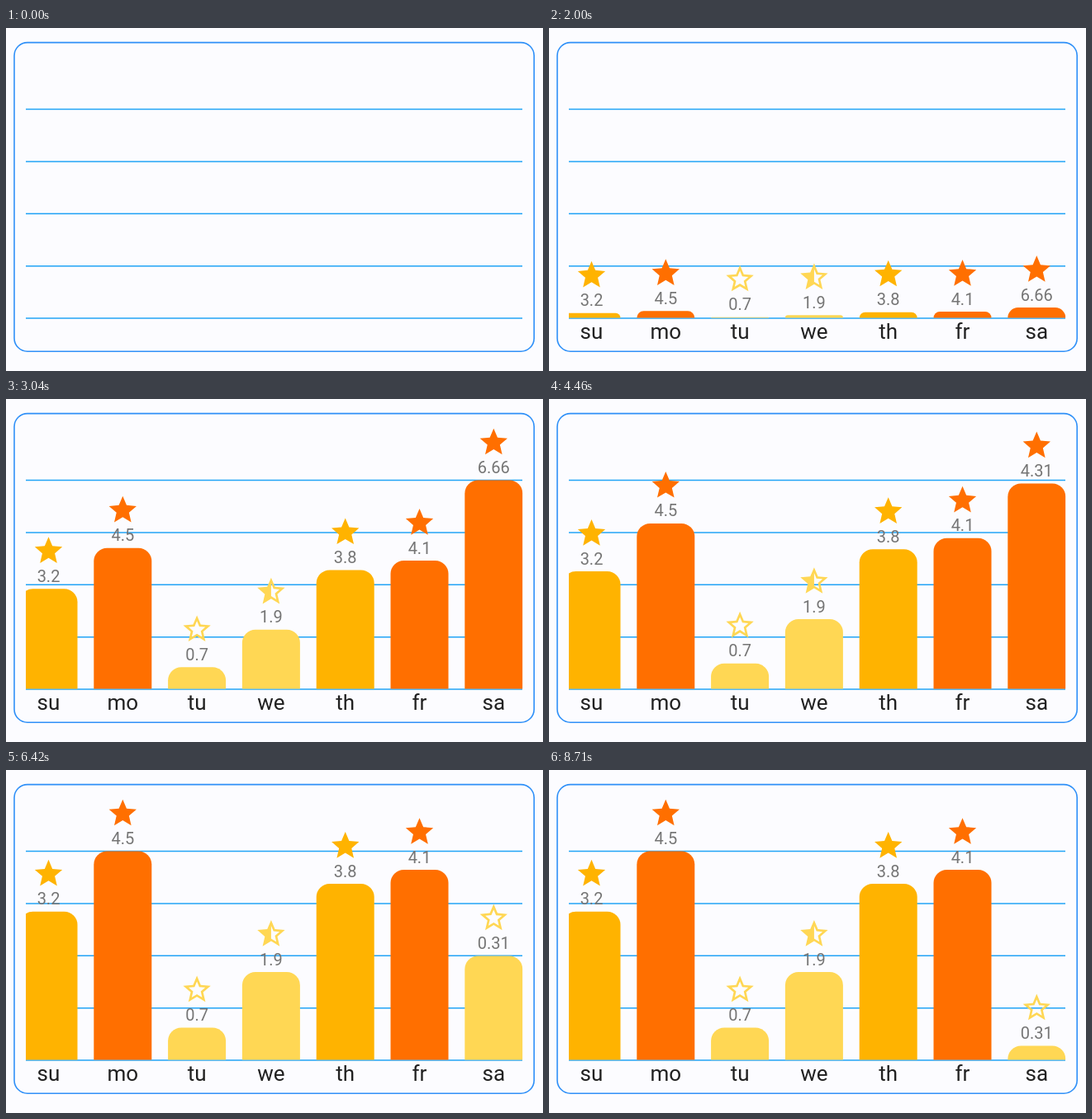
Animation, 650 px wide and 416 px high, one loop 8830 ms. Source, as an HTML page:

```html
<!DOCTYPE html>
<html lang="en">
<head>
<meta charset="utf-8">
<title>Weekly ratings</title>
<style>
  html, body { margin: 0; width: 100%; height: 100%; overflow: hidden; background: #fcfcff; }
  svg { display: block; width: 650px; height: 416px; font-family: Roboto, sans-serif; text-anchor: middle; }
  .card { fill: none; stroke: #2f90f8; stroke-width: 1.6; }
  .grid { stroke: #22a4f6; stroke-width: 1.5; }
  .value { font-size: 20px; fill: #757575; }
  .day { font-size: 26px; fill: #212121; }
</style>
</head>
<body>
<svg viewBox="0 0 650 416">
  <defs><clipPath id="plot"><rect x="24" y="0" width="601.5" height="416"/></clipPath></defs>
  <rect class="card" x="10" y="17.6" width="629.2" height="374.6" rx="16"/>
  <g class="grid" id="grid"></g>
  <g id="chart" clip-path="url(#plot)" visibility="hidden"></g>
</svg>
<script>
const LOOP = 8830, RUN = 1000;
const BASE = 352, HEIGHT = 253.4, BAR = 70, STEP = 89.8, FIRST = 51.5, RADIUS = 16;
const DAYS = ['su', 'mo', 'tu', 'we', 'th', 'fr', 'sa'];
const VALUES = [3.2, 4.5, 0.7, 1.9, 3.8, 4.1];
const SHOW = 1950;

// Last bar: each update starts at `at` and moves value and axis maximum.
const UPDATES = [
  { at: SHOW, from: 6.66, to: 6.66, maxFrom: 6.66, maxTo: 6.66 },
  { at: 4003, from: 6.66, to: 4.31, maxFrom: 6.66, maxTo: 4.5 },
  { at: 5905, from: 4.31, to: 0.31, maxFrom: 4.5, maxTo: 4.5 }
];

const OUTER = 'M12 17.27L18.18 21l-1.64-7.03L22 9.24l-7.19-.61L12 2 9.19 8.63 2 9.24l5.46 4.73L5.82 21z';
const STARS = {
  full: OUTER,
  half: OUTER + 'M12 15.4V6.1l1.71 4.04 4.38.38-3.32 2.88 1 4.28z',
  empty: OUTER + 'M12 15.4l-3.76 2.27 1-4.28-3.32-2.88 4.38-.38L12 6.1l1.71 4.04 4.38.38-3.32 2.88 1 4.28z'
};

const chart = document.getElementById('chart');
const grid = document.getElementById('grid');

function add(parent, tag, attrs = {}, text = '') {
  const node = document.createElementNS('http://www.w3.org/2000/svg', tag);
  for (const key in attrs) node.setAttribute(key, attrs[key]);
  node.textContent = text;
  parent.append(node);
  return node;
}

const color = v => v >= 4 ? '#ff6f00' : v >= 3 ? '#ffb300' : '#ffd754';
const star = v => v >= 3 ? STARS.full : v >= 1 ? STARS.half : STARS.empty;
const mix = (a, b, p) => a + (b - a) * p;

for (let i = 0; i <= 4; i++) {
  const y = BASE - HEIGHT * i / 4;
  add(grid, 'line', { x1: 24, x2: 625, y1: y, y2: y });
}

const bars = DAYS.map((day, i) => {
  const x = FIRST + i * STEP;
  add(chart, 'text', { class: 'day', x, y: 377 }, day);
  const group = add(chart, 'g');
  return {
    x, group,
    body: add(group, 'path'),
    label: add(group, 'text', { class: 'value', y: -8.5 }),
    icon: add(group, 'path', { transform: 'translate(-20 -66.3) scale(1.6667)', 'fill-rule': 'evenodd' })
  };
});

function setValue(bar, v) {
  if (bar.value === v) return;
  bar.value = v;
  bar.label.textContent = v;
  bar.icon.setAttribute('d', star(v));
  bar.group.setAttribute('fill', color(v));
}

function setHeight(bar, full) {
  const h = Math.max(0, full - 0.5), r = Math.min(RADIUS, h), w = BAR - 2 * r;
  bar.group.setAttribute('transform', `translate(${bar.x} ${BASE - full})`);
  bar.body.setAttribute('d',
    `M${-BAR / 2} ${h}V${r}a${r} ${r} 0 0 1 ${r} ${-r}h${w}a${r} ${r} 0 0 1 ${r} ${r}V${h}z`);
}

function draw(t) {
  chart.setAttribute('visibility', t < SHOW ? 'hidden' : 'visible');
  if (t < SHOW) return;
  const u = UPDATES.filter(item => t >= item.at).pop();
  const p = Math.min(1, (t - u.at) / RUN);
  const grow = Math.min(1, (t - SHOW) / RUN);
  const unit = grow * HEIGHT / mix(u.maxFrom, u.maxTo, p);
  bars.forEach((bar, i) => {
    const last = i === VALUES.length;
    setValue(bar, last ? u.to : VALUES[i]);
    setHeight(bar, unit * (last ? mix(u.from, u.to, p) : VALUES[i]));
  });
}

const start = performance.now();
function tick() {
  draw((performance.now() - start) % LOOP);
  requestAnimationFrame(tick);
}
tick();
</script>
</body>
</html>
```
